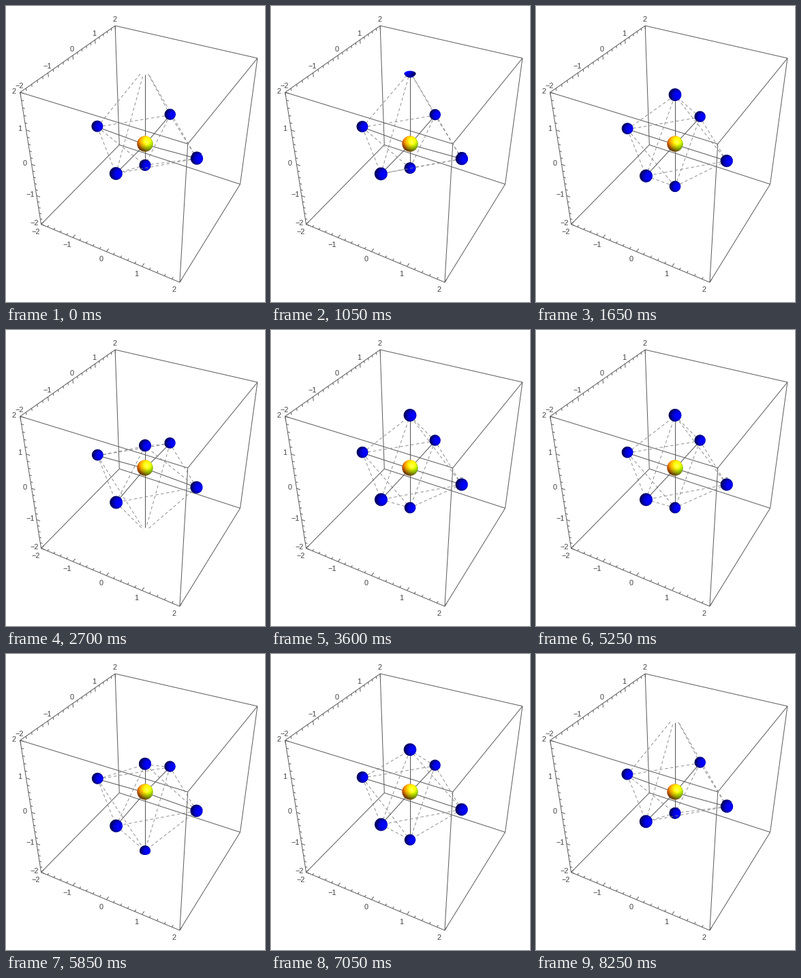
Write a matplotlib script that moves like this. It is 380 px wide and 436 px high and loops after 9000 ms.

```python
import numpy as np
import matplotlib.pyplot as plt
from matplotlib.animation import FuncAnimation

W, H, DPI = 380, 436, 100
PX = 72 / DPI                      # points per pixel
FRAMES, STEP_MS = 60, 150
HOLD, PERIOD = 5, 24.5             # still frames at each end, frames per swing
LIMIT = 2.0                        # half size of the box
BOND, SWING, DRIFT = np.sqrt(2), 0.75, 0.075

plt.rcParams["font.family"] = "Liberation Sans"
plt.rcParams["lines.scale_dashes"] = False

# Camera


def unit(v):
    return v / np.linalg.norm(v)


CAM = np.array([5.2, -9.6, 8.0])
UP = np.array([0.0, 0.0, 1.0])
FWD = unit(-CAM)
RIGHT = unit(np.cross(FWD, UP))
TOP = np.cross(RIGHT, FWD)
CX, CY, SCALE = 204, 204, 791


def project(p):
    """Return screen x, screen y and depth."""
    rel = np.asarray(p, float) - CAM
    depth = rel @ FWD
    return CX + SCALE * (rel @ RIGHT) / depth, CY - SCALE * (rel @ TOP) / depth, depth


# Balls: lights are directions in view space (right, up, to the viewer)

AMBIENT = np.array([0.4, 0.2, 0.2])
LIGHTS = [
    (unit(np.array([1.5, -0.5, 1.5])), np.array([0.0, 0.18, 0.5])),
    (unit(np.array([1.5, 1.5, 2.5])), np.array([0.18, 0.5, 0.18])),
    (unit(np.array([-0.5, 1.5, 1.5])), np.array([0.5, 0.18, 0.0])),
    (unit(np.array([-0.5, -0.5, 1.5])), np.array([0.0, 0.0, 0.18])),
]
SHINE_DIR = unit(LIGHTS[1][0] + np.array([0, 0, 1]))
BLUE, YELLOW = np.array([0, 0, 1.0]), np.array([1.0, 1.0, 0])
LIGAND_R, CORE_R = 0.15, 0.2
SUB = 4                            # samples per pixel side


def shade(n, base, shine):
    light = np.zeros(n.shape) + AMBIENT
    for way, colour in LIGHTS:
        light += np.clip(n @ way, 0, None)[..., None] * colour
    gloss = shine * np.clip(n @ SHINE_DIR, 0, None) ** 25
    return np.clip(1.1 * light * base + gloss[..., None], 0, 1)


def paint_ball(img, p, r, base, shine=0.0):
    x, y, depth = project(p)
    rad = r * SCALE / depth
    x0, x1 = int(x - rad) - 1, int(x + rad) + 3
    y0, y1 = int(y - rad) - 1, int(y + rad) + 3
    sx = x0 + (np.arange((x1 - x0) * SUB) + 0.5) / SUB
    sy = y0 + (np.arange((y1 - y0) * SUB) + 0.5) / SUB
    nx, ny = np.meshgrid((sx - x) / rad, (y - sy) / rad)
    rr = nx ** 2 + ny ** 2
    nz = np.sqrt(np.clip(1 - rr, 0, None))

    # cut the sphere at the box, so its inside may show through the opening
    e3 = unit(CAM - p)
    e2 = np.cross(e3, unit(np.cross(UP, e3)))
    front = np.abs(p[2] + r * (ny * e2[2] + nz * e3[2])) <= LIMIT
    back = np.abs(p[2] + r * (ny * e2[2] - nz * e3[2])) <= LIMIT
    seen = (rr <= 1) & (front | back)
    flip = np.where(front, 1, -1)
    rgb = shade(np.stack([nx * flip, ny * flip, nz], -1), base, shine)

    def shrink(a):
        return a.reshape(y1 - y0, SUB, x1 - x0, SUB, -1).mean(axis=(1, 3))

    cover = shrink(seen.astype(float))
    colour = shrink(rgb * seen[..., None])
    patch = img[y0:y1, x0:x1]
    patch[..., :3] = colour + patch[..., :3] * (1 - cover)
    patch[..., 3:] = cover + patch[..., 3:] * (1 - cover)


# Stage

fig = plt.figure(figsize=(W / DPI, H / DPI), dpi=DPI, facecolor="white")
ax = fig.add_axes([0, 0, 1, 1])
ax.axis("off")


def add_line(a, b, colour, width=1.0, **kw):
    (ax_, ay, _), (bx, by, _) = project(a), project(b)
    return ax.plot([ax_, bx], [ay, by], color=colour, lw=width * PX,
                   solid_capstyle="butt", **kw)[0]


def draw_box():
    for axis in range(3):
        for s in (-LIMIT, LIMIT):
            for t in (-LIMIT, LIMIT):
                a = np.insert([s, t], axis, -LIMIT)
                b = np.insert([s, t], axis, LIMIT)
                add_line(a, b, "#5c5c5c", zorder=1)


def draw_axis(axis, fixed, inward, shift):
    """Ticks and numbers along one box edge."""
    for i in range(-10, 11):
        v = i / 5
        major = i % 5 == 0
        p = np.insert(np.array(fixed, float), axis, v)
        add_line(p, p + np.array(inward) * (0.11 if major else 0.065),
                 "#5c5c5c", zorder=1)
        if major:
            x, y, _ = project(p)
            ax.text(x + shift[0], y + shift[1], f"{i // 5}".replace("-", "\u2212"),
                    size=11 * PX, color="#444444", ha="center",
                    va="center_baseline")


draw_box()
draw_axis(0, (-LIMIT, -LIMIT), (0, 1, 0), (-8, 10))
draw_axis(1, (-LIMIT, LIMIT), (0, 0, -1), (-1, -10))
draw_axis(2, (-LIMIT, -LIMIT), (1, 0, 0), (-9.5, -2.5))

# Molecule: left, right, front, back, bottom, top

REST = BOND * np.array([[-1, 0, 0], [1, 0, 0], [0, -1, 0], [0, 1, 0],
                        [0, 0, -1], [0, 0, 1]])
EDGES = [(i, j) for i in range(6) for j in range(i + 1, 6) if i // 2 != j // 2]
NEAR_EDGE = (1, 2)                 # the one edge that passes before a ball
CORE = np.zeros(3)

spokes = [add_line(CORE, p, "#555555", zorder=2) for p in REST]
dashed = [add_line(REST[i], REST[j], "#858585", 0.9, dashes=(4.5 * PX, 3.5 * PX),
                   dash_capstyle="butt", zorder=4 if (i, j) == NEAR_EDGE else 2)
          for i, j in EDGES]
balls = ax.imshow(np.zeros((H, W, 4)), extent=(0, W, H, 0), zorder=3,
                  interpolation="nearest", aspect="auto")
ax.set_xlim(0, W)
ax.set_ylim(H, 0)


def place(line, a, b):
    """Move a line, ending it where b leaves the box."""
    if abs(b[2]) > LIMIT:
        a, b = a, a + (b - a) * (np.sign(b[2]) * LIMIT - a[2]) / (b[2] - a[2])
    (x0, y0, _), (x1, y1, _) = project(a), project(b)
    line.set_data([x0, x1], [y0, y1])


def update(n):
    k = min(max(n - HOLD, 0), 2 * PERIOD)
    wave = np.cos(2 * np.pi * k / PERIOD)
    pos = REST.copy()
    pos[:4, 2] += DRIFT * wave
    pos[4:, 2] += SWING * wave

    for line, p in zip(spokes, pos):
        place(line, CORE, p)
    for line, (i, j) in zip(dashed, EDGES):
        a, b = pos[i], pos[j]
        if (i, j) == NEAR_EDGE:
            trim = unit(b - a) * LIGAND_R
            a, b = a + trim, b - trim
        place(line, a, b)

    img = np.zeros((H, W, 4))
    parts = [(p, LIGAND_R, BLUE, 0.0) for p in pos] + [(CORE, CORE_R, YELLOW, 0.35)]
    for part in sorted(parts, key=lambda q: -project(q[0])[2]):
        paint_ball(img, *part)
    alpha = img[..., 3:]
    img[..., :3] /= np.where(alpha > 0, alpha, 1)
    balls.set_data(np.clip(img, 0, 1))
    return [*spokes, *dashed, balls]


anim = FuncAnimation(fig, update, frames=FRAMES, interval=STEP_MS,
                     repeat=True, repeat_delay=0, blit=False)
plt.show()
```
